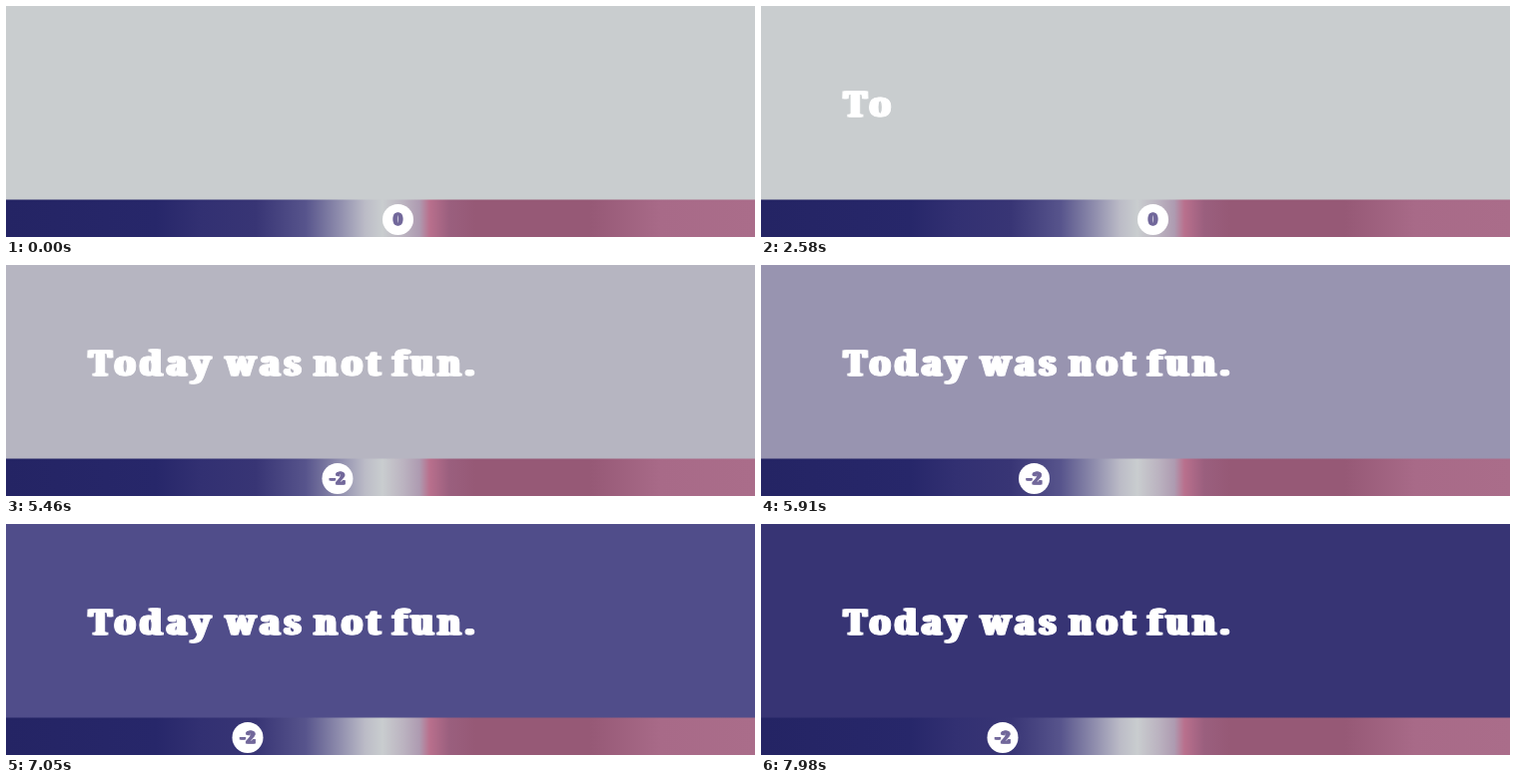
An HTML page that plays this animation: 750x232 px, repeating every 8 s.

```html
<!DOCTYPE html>
<html lang="en">
<head>
<meta charset="utf-8">
<title>Mood slider</title>
<style>
  html, body { margin: 0; width: 100%; height: 100%; overflow: hidden; background: #c9cdcf; }
  svg { display: block; width: 750px; height: 232px; }
  text { font-family: "Noto Serif", "DejaVu Serif", serif; font-weight: 900; stroke-linejoin: miter; }
  #line { font-size: 35px; letter-spacing: 3.8px; fill: #fff; stroke: #fff; stroke-width: 1px; }
  #label { font-size: 16px; letter-spacing: 1.2px; fill: #72689b; stroke: #72689b; stroke-width: .8px; text-anchor: middle; }
</style>
</head>
<body>
<svg viewBox="0 0 750 232">
  <defs><linearGradient id="scale" gradientUnits="userSpaceOnUse" x1="0" x2="750"></linearGradient></defs>
  <rect id="page" width="750" height="195"/>
  <rect y="194.5" width="750" height="38" fill="url(#scale)"/>
  <!-- Shifted copies thicken the upright strokes into a fat slab. -->
  <text id="line" y="111"></text>
  <use href="#line" x="-1.5"/>
  <use href="#line" x="1.5"/>
  <g id="knob">
    <circle r="15.5" fill="#fff"/>
    <text id="label" x=".6" y="5.8"></text>
    <use href="#label" x="-.8"/>
    <use href="#label" x=".8"/>
  </g>
</svg>
<script>
const LOOP = 8000, SLIDE_START = 5000, SLIDE_TIME = 1865;
const SVG = 'http://www.w3.org/2000/svg';
const $ = id => document.getElementById(id);
const add = (parent, tag, attrs) => {
  const el = document.createElementNS(SVG, tag);
  for (const key in attrs) el.setAttribute(key, attrs[key]);
  return parent.appendChild(el);
};
const mix = (a, b, k) => a + (b - a) * k;

const stops = [
  [0, '#242464'], [150, '#27276a'], [195, '#323072'], [250, '#383575'], [300, '#57548c'],
  [335, '#918fae'], [360, '#bcbcc7'], [377, '#c9cdcf'], [398, '#bbb3c0'], [414, '#ae9bb1'],
  [424, '#b9708d'], [444, '#9a5f7e'], [470, '#965976'], [585, '#965976'], [655, '#a86a88'], [750, '#aa6d8a']
];
for (const [x, color] of stops) add($('scale'), 'stop', { offset: x / 750, 'stop-color': color });

// Each word: left edge and the time of each key press.
const words = [
  ['Today', 83, [2400, 2520, 2640, 2880, 3120]],
  ['was', 220, [3360, 3510, 3660]],
  ['not', 308.5, [3960, 4200, 4380]],
  ['fun.', 387, [4560, 4680, 4770, 4890]]
].map(([text, x, keys]) => ({ text, keys, span: add($('line'), 'tspan', { x }) }));

// Page colour by time since the slide began.
const fade = [
  [0, [201, 205, 207]], [450, [183, 182, 193]], [900, [153, 149, 176]],
  [1320, [113, 109, 159]], [2040, [80, 77, 138]], [2970, [55, 52, 116]]
];

function colorAt(time) {
  const next = fade.findIndex(([at]) => at > time);
  if (next < 0) return fade[fade.length - 1][1];
  if (next === 0) return fade[0][1];
  const [t0, from] = fade[next - 1], [t1, to] = fade[next];
  return from.map((c, i) => Math.round(mix(c, to[i], (time - t0) / (t1 - t0))));
}

// cubic-bezier(.25, .1, .25, 1)
function ease(x) {
  if (x <= 0 || x >= 1) return x <= 0 ? 0 : 1;
  const bezier = (a, b, s) => 3 * a * s * (1 - s) ** 2 + 3 * b * s * s * (1 - s) + s ** 3;
  let low = 0, high = 1;
  for (let i = 0; i < 20; i++) {
    const mid = (low + high) / 2;
    if (bezier(.25, .25, mid) < x) low = mid; else high = mid;
  }
  return bezier(.1, 1, low);
}

function setText(el, text) {
  if (el.textContent !== text) el.textContent = text;
}

function draw(t) {
  for (const { text, keys, span } of words)
    setText(span, text.slice(0, keys.filter(key => key <= t).length));
  const since = t - SLIDE_START;
  const x = mix(392.5, 242, ease(since / SLIDE_TIME));
  $('knob').setAttribute('transform', `translate(${x.toFixed(2)} 214.5)`);
  setText($('label'), since < 0 ? '0' : '-2');
  $('page').setAttribute('fill', `rgb(${colorAt(Math.max(0, since))})`);
}

const start = performance.now();
function tick() {
  draw((performance.now() - start) % LOOP);
  requestAnimationFrame(tick);
}
tick();
</script>
</body>
</html>
```
